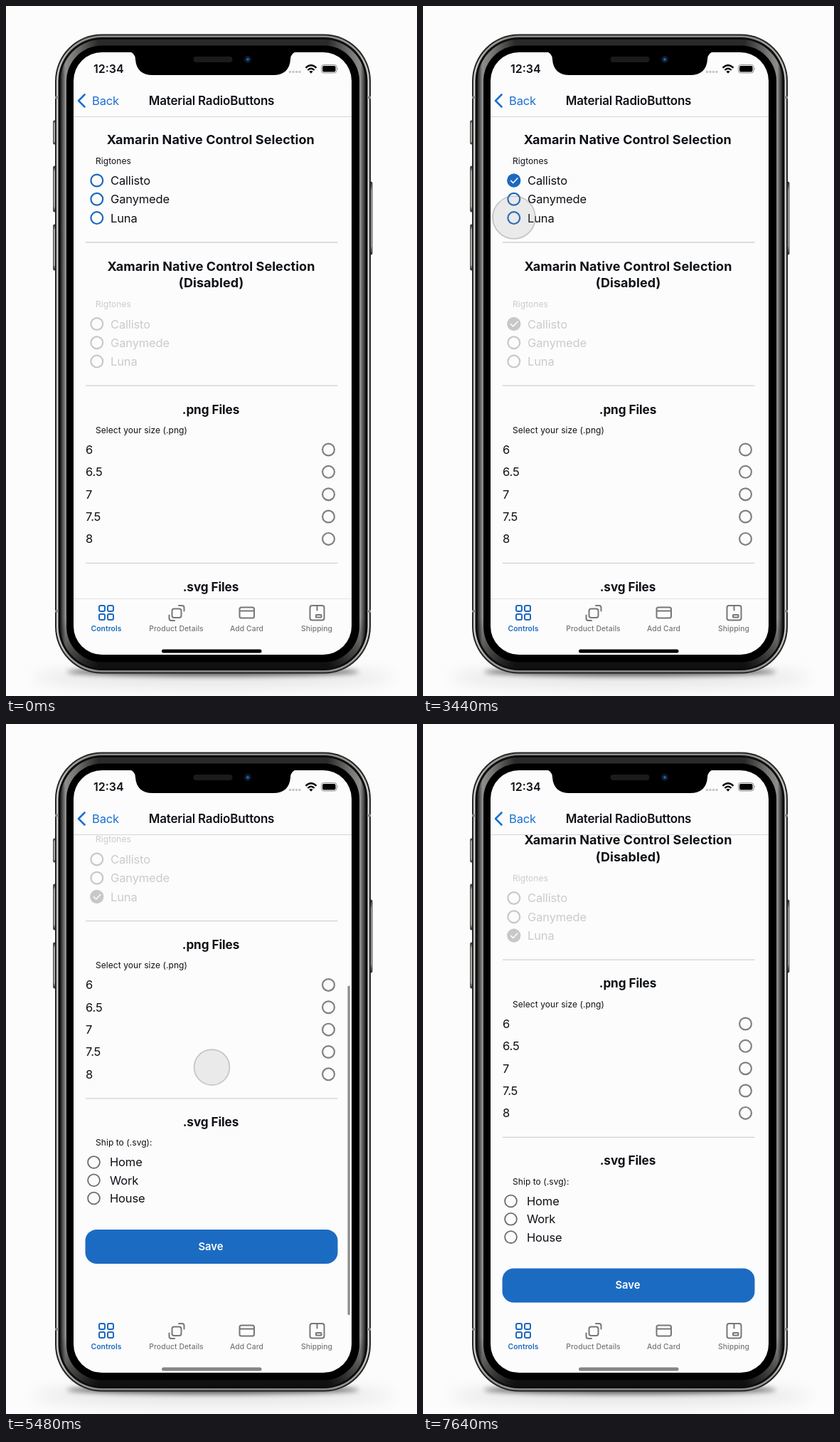
Animation of 578x969 px, one loop 8 s. Source, as an HTML page:

```html
<!DOCTYPE html>
<html lang="en">
<head>
<meta charset="utf-8">
<title>Radio buttons</title>
<style>
  html, body { margin: 0; width: 100%; height: 100%; overflow: hidden; background: #fcfcfc; }
  svg { display: block; width: 578px; height: 969px; font-family: Inter, Roboto, sans-serif; }
  text { fill: #0e1116; }
  .head { font-size: 18px; font-weight: 660; text-anchor: middle; letter-spacing: .06px; }
  .short { font-size: 17.2px; letter-spacing: -.1px; }
  .note { font-size: 12px; letter-spacing: .06px; }
  .item { font-size: 16.5px; letter-spacing: -.15px; }
  .title { font-size: 17px; font-weight: 600; letter-spacing: -.2px; text-anchor: middle; }
  .tab { font-size: 10.3px; font-weight: 500; letter-spacing: .1px; text-anchor: middle; fill: #777; }
  .off text { fill: #cbcbcb; }
  .line { fill: none; stroke-width: 2; stroke-linecap: round; stroke-linejoin: round; }
  .blue { stroke: #1c69bf; }
  .grey { stroke: #777; }
  .rule { stroke: #d2d2d2; stroke-width: 1.3; }
</style>
</head>
<body>
<svg viewBox="0 0 578 969">
  <defs>
    <linearGradient id="steel" gradientUnits="userSpaceOnUse" x1="71" x2="291" y1="0" y2="0" spreadMethod="reflect">
      <stop offset="0" stop-color="#d0d0cd"/><stop offset=".08" stop-color="#a0a09e"/>
      <stop offset=".25" stop-color="#8c8c8a"/><stop offset="1" stop-color="#8c8c8a"/>
    </linearGradient>
    <linearGradient id="bevel" gradientUnits="userSpaceOnUse" x1="76" x2="291" y1="0" y2="0" spreadMethod="reflect">
      <stop offset="0" stop-color="#1a1a1a"/><stop offset=".035" stop-color="#8d8d8b"/>
      <stop offset=".1" stop-color="#767674"/><stop offset=".25" stop-color="#2a2a2a"/>
      <stop offset="1" stop-color="#2a2a2a"/>
    </linearGradient>
    <linearGradient id="shade" x1="0" x2="0" y1="0" y2="1">
      <stop offset=".92" stop-opacity="0"/><stop offset="1" stop-opacity=".65"/>
    </linearGradient>
    <linearGradient id="key" x1="0" x2="0" y1="0" y2="1">
      <stop offset="0" stop-color="#222"/><stop offset=".12" stop-color="#a5a5a3"/>
      <stop offset=".88" stop-color="#a5a5a3"/><stop offset="1" stop-color="#222"/>
    </linearGradient>
    <filter id="soft" x="-20%" y="-200%" width="140%" height="500%"><feGaussianBlur stdDeviation="11"/></filter>
    <filter id="tight" x="-20%" y="-300%" width="140%" height="700%"><feGaussianBlur stdDeviation="3.5"/></filter>
    <clipPath id="view"><rect x="95" y="156" width="391" height="676"/></clipPath>
  </defs>

  <rect width="578" height="969" fill="#fcfcfc"/>
  <ellipse cx="291" cy="943" rx="255" ry="14" opacity=".09" filter="url(#soft)"/>
  <ellipse cx="291" cy="935" rx="205" ry="6" opacity=".6" filter="url(#tight)"/>

  <!-- phone body -->
  <g fill="url(#key)" stroke="#333" stroke-width=".8">
    <rect x="66.5" y="161" width="5" height="33" rx="1.5"/>
    <rect x="66.5" y="225" width="5" height="64" rx="1.5"/>
    <rect x="66.5" y="307" width="5" height="64" rx="1.5"/>
    <rect x="510" y="247" width="5" height="102" rx="1.5"/>
  </g>
  <rect x="69" y="39.5" width="444" height="898" rx="66" fill="#252525"/>
  <rect x="71" y="41.5" width="440" height="894" rx="64" fill="url(#steel)"/>
  <rect x="73.5" y="44" width="435" height="889" rx="61.5" fill="#0d0d0d"/>
  <rect x="76.5" y="47" width="429" height="883" rx="58.5" fill="url(#bevel)"/>
  <rect x="76.5" y="47" width="429" height="883" rx="58.5" fill="url(#shade)"/>
  <rect x="85" y="55.5" width="412" height="866" rx="50" fill="#000"/>
  <path d="M69 128.5h5M69 850h5M508 128.5h5M508 850h5" stroke="#858583" stroke-width="3.5"/>
  <rect x="95" y="65" width="391" height="846" rx="40" fill="#fcfcfc"/>
  <path d="M172 64Q181.500 65 182 75C183 90 192 97 206 97H376C390 97 399 90 400 75Q400.500 65 410 64Z"/>
  <rect x="263.500" y="71" width="55" height="8" rx="4" fill="#1b1b1b"/>
  <circle cx="340" cy="75" r="5" fill="#0b1a30"/>
  <circle cx="340" cy="75" r="2" fill="#2b619f"/>

  <!-- status and navigation -->
  <text x="123" y="94" font-size="16" font-weight="600">12:34</text>
  <g fill="#c4c4c4">
    <circle cx="399.500" cy="92.500" r="1.700"/><circle cx="404" cy="92.500" r="1.700"/>
    <circle cx="408.500" cy="92.500" r="1.700"/><circle cx="413" cy="92.500" r="1.700"/>
  </g>
  <g fill="none" stroke="#000" stroke-width="2.300">
    <path d="M421.500 86.800Q429 79.800 436.500 86.800M424.400 90Q429 85.600 433.600 90"/>
  </g>
  <path d="M426.400 92Q429 89.800 431.600 92L429 94.800Z"/>
  <rect x="443.500" y="82.500" width="21.500" height="11.500" rx="3.300" fill="none" stroke="#8d8d8d"/>
  <rect x="445" y="84" width="18.500" height="8.500" rx="2"/>
  <path d="M466.200 86.200q1.800 2 0 4z" fill="#8d8d8d"/>
  <path class="line" d="M110.500 124.500L102 133l8.500 8.500" stroke="#1a70d2" style="stroke-width:2.600"/>
  <text class="item" x="121" y="139" style="fill:#1a70d2">Back</text>
  <text class="title" x="289" y="139">Material RadioButtons</text>
  <path d="M95 155.500H486" stroke="#d6d6d6"/>

  <g clip-path="url(#view)"><g id="page"></g></g>

  <!-- tab bar -->
  <path id="edge" d="M95 832.500H486" stroke="#e2e2e2"/>
  <g class="line blue">
    <rect x="131" y="842" width="8" height="8" rx="2"/><rect x="143" y="842" width="8" height="8" rx="2"/>
    <rect x="131" y="854" width="8" height="8" rx="2"/><rect x="143" y="854" width="8" height="8" rx="2"/>
  </g>
  <g class="line grey">
    <rect x="233.500" y="846.500" width="13" height="12.500" rx="3"/>
    <path d="M243 842h4.500q3 0 3 3v4.500M229.500 855.500v4.500q0 3 3 3h4.500"/>
    <rect x="328.500" y="844.500" width="20.500" height="15" rx="2.500"/><path d="M329 849.500h20"/>
    <rect x="427.500" y="842" width="20" height="20.500" rx="3"/>
    <path d="M437.500 842v6.500"/><rect x="436" y="855" width="7.500" height="3.500" rx=".5"/>
  </g>
  <text class="tab" x="141" y="878" style="fill:#1c69bf;font-weight:600">Controls</text>
  <text class="tab" x="239.500" y="878">Product Details</text>
  <text class="tab" x="338.500" y="878">Add Card</text>
  <text class="tab" x="437" y="878">Shipping</text>
  <rect id="home" x="219" y="903.500" width="140.500" height="5" rx="2.500"/>

  <rect id="bar" x="480.500" width="3.200" rx="1.600" fill="#8c8c8c"/>
  <circle id="touch" fill="rgba(128,128,128,.15)" stroke="rgba(128,128,128,.4)" stroke-width="1.700"/>
</svg>
<script>
const $ = id => document.getElementById(id);
const text = (cls, x, y, s) => `<text class="${cls}" x="${x}" y="${y}">${s}</text>`;
const rule = y => `<path class="rule" d="M112 ${y}H466.500"/>`;
const ring = (x, y, color, w = 2.2) =>
  `<circle cx="${x}" cy="${y}" r="8.400" fill="none" stroke="${color}" stroke-width="${w}"/>`;
const tick = (y, color) => `<g class="tick"><circle cx="127.800" cy="${y}" r="9.500" fill="${color}"/>
  <path class="line" d="M123.500 ${y + .2}l3.200 3.200 6.200-6.500" stroke="#fff" style="stroke-width:1.500"/></g>`;

const moons = (top, color) => ['Callisto', 'Ganymede', 'Luna'].map((name, i) => {
  const y = top + i * 26.3;
  return ring(127.8, y, color) + tick(y, color) + text('item', 147, y + 6, name);
}).join('');

const sizes = ['6', '6.5', '7', '7.5', '8'].map((s, i) => {
  const y = 623 + i * 31.35;
  return text('item', 112, y + 6, s) + ring(453.5, y, '#808080');
}).join('');

const places = ['Home', 'Work', 'House'].map((s, i) => {
  const y = 872 + i * 25.3;
  return ring(123.5, y, '#6c6c6c', 1.8) + text('item', 146, y + 6, s);
}).join('');

$('page').innerHTML =
  text('head', 287.8, 194, 'Xamarin Native Control Selection') +
  text('note', 126, 221.5, 'Rigtones') +
  moons(245, '#1c69bf') + rule(332) +
  text('head', 288.5, 371.5, 'Xamarin Native Control Selection') +
  text('head', 288.5, 395, '(Disabled)') +
  `<g class="off">${text('note', 126, 423, 'Rigtones') + moons(446.5, '#c8c8c8')}</g>` + rule(533.2) +
  text('head short', 288, 572.5, '.png Files') +
  text('note', 126, 600, 'Select your size (.png)') + sizes + rule(782.4) +
  text('head short', 288, 821.5, '.svg Files') +
  text('note', 126, 849, 'Ship to (.svg):') + places +
  '<rect x="111.500" y="966.500" width="355" height="48" rx="16" fill="#1c6bc2"/>' +
  '<text x="288" y="995.300" font-size="14.800" font-weight="600" text-anchor="middle" style="fill:#fff">Save</text>';

const ticks = [...document.querySelectorAll('.tick')];
const LOOP = 8000, STEP = 40, END = 202, RELEASE = 5600, FADE = 360;
const clamp = v => Math.max(0, Math.min(1, v));
const smooth = u => u * u * u * (u * (6 * u - 15) + 10);

// Finger travel, then rubber band past the end and a damped return.
const drag = t => 325 * smooth(clamp((t - 5115) / 435));
const rubber = d => d < END ? d : END + (d - END) * .485;
function scrollAt(t) {
  if (t < 5160) return 0;
  if (t < RELEASE) return rubber(drag(t));
  const k = (t - RELEASE) * .0072;
  return END + (rubber(325) - END) * (1 + k) * Math.exp(-k);
}

const touches = [
  { from: 1400, up: 1760, x: 128, r: 30, y: () => 244.5 },
  { from: 3440, up: 3840, x: 128, r: 30, y: () => 297 },
  { from: 5200, up: RELEASE, x: 289.5, r: 25, y: t => 796.6 - drag(t) }
];

function draw(t) {
  const s = scrollAt(t);
  $('page').setAttribute('transform', `translate(0 ${-s})`);

  const picked = t < 1760 ? -1 : t < 3840 ? 0 : 2;
  ticks.forEach((el, i) => el.style.display = i % 3 === picked ? '' : 'none');

  const top = s < END ? 158.2 + s * .767 : 313 + s - END;
  $('bar').setAttribute('y', top);
  $('bar').setAttribute('height', Math.min(517, 830 - top));
  $('bar').style.opacity = t < 5160 ? 0 : 1 - clamp((t - 7480) / 160);

  $('edge').style.opacity = s < 200 ? 1 : 0;
  const g = Math.round(133 * clamp((t - 5200) / 240));
  $('home').style.fill = `rgb(${g},${g},${g})`;

  const p = touches.find(o => t >= o.from && t < o.up + FADE);
  $('touch').style.display = p ? '' : 'none';
  if (!p) return;
  $('touch').setAttribute('cx', p.x);
  $('touch').setAttribute('cy', p.y(t));
  $('touch').setAttribute('r', p.r);
  $('touch').style.opacity = 1 - clamp((t + STEP - p.up) / (FADE + STEP));
}

const start = performance.now();
function tickFrame(now) {
  const t = Math.max(0, now - start) % LOOP;
  draw(Math.floor(t / STEP) * STEP);
  requestAnimationFrame(tickFrame);
}
draw(0);
requestAnimationFrame(tickFrame);
</script>
</body>
</html>
```
